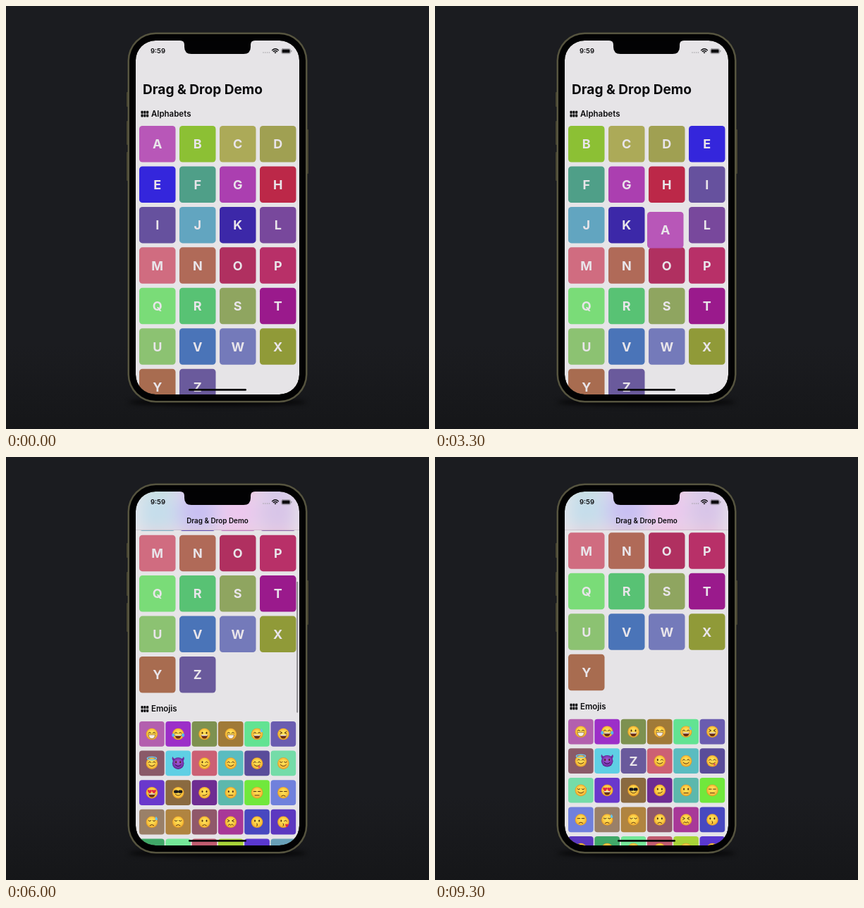
Animation, 600 px wide and 600 px high, one loop 9.4 s. Source, as an HTML page with a canvas:

```html
<!DOCTYPE html>
<html lang="en">
<head>
<meta charset="utf-8">
<title>Drag &amp; Drop Demo</title>
<style>
  html, body { margin: 0; width: 100%; height: 100%; overflow: hidden; background: #1b1c20; }
  canvas { display: block; }
</style>
</head>
<body>
<canvas id="stage" width="600" height="600"></canvas>
<script>
const canvas = document.getElementById('stage');
const ctx = canvas.getContext('2d');
const LOOP = 9400;
const PAPER = '#e6e4e7', INK = '#0b0b0d', LETTER = '#e9e5ea';

const letterColors = ('b857b8 8cc034 acaa58 a0a052 3426dc 4f9f88 ab3fb0 bc2848 66519e 62a5c0 3c28a8 78489c d06c80 ' +
  'b06a58 b03060 b83068 7adc78 58c274 8fa560 9a1a8c 8cc272 4a74b8 747aba 909a38 a86c50 6a5a9c').split(' ');
const faceColors = ('b35fae 9c2fc8 7d9150 a07a38 62e392 6a5cb0 8a5a68 5fcfe4 cc6074 5abcc0 5a4c9a 74dca8 6a38cc 8a6a40 ' +
  '6e2c92 5cb8ac 70e83c 7080dc 9a8068 b08440 90586a a83898 4848c0 5c38c0 40a868 74e898 c05c70 a8d438 5a38d0 68a0b8').split(' ');
// Each face is eyes, mouth and an optional extra.
const faces = '^T ^Dt oD ^T ^Dd >D ^)a oIi w) ^) ^)y u) hD s) o/ o- -- -( u(d u( o( >~ o. w.k ^. u. w) >) o( ^)'.split(' ');

// Drag paths: time, x, y, opacity, size (size for the second only).
const dragA = [[0, 189, 170, 1], [950, 189, 170, 1], [1150, 197, 174, .8], [1600, 260.5, 184, .8], [2000, 262, 226, .8],
  [2600, 286, 272, .8], [3000, 300, 293, .8], [3200, 300.5, 293, .85], [3300, 301, 292, 1], [3550, 303, 285, 1]];
const dragZ = [[6700, 246, 280, 1, 51.5], [7100, 241, 282, 1, 51.5], [7300, 242, 291, .8, 51.5], [7850, 255, 362, .8, 51.5],
  [8050, 263, 392, .8, 36], [8500, 270, 418, .8, 36], [8700, 269, 417, .9, 36], [8950, 263.6, 413, 1, 36]];
const scrollKeys = [[4150, 0], [4400, 22], [4700, 90], [5000, 152], [5400, 191], [5600, 212], [5900, 230], [6200, 235]];
const hovers = [[1430, 1], [1950, 5], [2250, 6], [2650, 10]];

const clamp = v => Math.max(0, Math.min(1, v));
const mix = (a, b, p) => a + (b - a) * p;
const ease = p => { p = clamp(p); return p * p * (3 - 2 * p); };

function track(keys, t) {
  let i = 0;
  while (i < keys.length - 2 && t > keys[i + 1][0]) i++;
  const [a, b] = [keys[i], keys[i + 1]];
  const p = clamp((t - a[0]) / (b[0] - a[0]));
  return a.slice(1).map((v, n) => mix(v, b[n + 1], p));
}

function box(x, y, w, h, r, color) {
  ctx.fillStyle = color;
  ctx.beginPath();
  ctx.roundRect(x, y, w, h, r);
  ctx.fill();
}

function text(str, x, y, size, color = INK, weight = 600, align = 'left') {
  ctx.font = `${weight} ${size}px Inter, sans-serif`;
  ctx.textAlign = align;
  ctx.fillStyle = color;
  ctx.fillText(str, x, y + size * .364);
}

function disc(x, y, rx, ry, color) {
  ctx.fillStyle = color;
  ctx.beginPath();
  ctx.ellipse(x, y, rx, ry, 0, 0, 7);
  ctx.fill();
}

function line(d, color, width = 1) {
  ctx.strokeStyle = color;
  ctx.lineWidth = width;
  ctx.stroke(new Path2D(d));
}

function shape(d, color) {
  ctx.fillStyle = color;
  ctx.fill(new Path2D(d));
}

function heading(str, y) {
  for (let i = 0; i < 6; i++) box(191.5 + i % 3 * 3.8, y - 3.7 + (i / 3 | 0) * 4.8, 3.1, 4, .8, INK);
  text(str, 206, y, 11.5);
}

function letterTile(i, x, y, size = 51.5) {
  box(x, y, size, size, 4.5, '#' + letterColors[i]);
  text(String.fromCharCode(65 + i), x + size / 2, y + size / 2, 18, LETTER, 700, 'center');
}

function eye(kind, x, side) {
  const brown = '#4a2c10';
  ctx.save();
  ctx.translate(x, -1.8);
  if (kind === 'w') kind = side < 0 ? 'o' : '^';
  if (kind === 'o') disc(0, 0, 1, 1.5, brown);
  if (kind === '^') line('M-1.8 .7Q0-2 1.8 .7', brown);
  if (kind === 'u') line('M-1.8-.3Q0 1.7 1.8-.3', brown);
  if (kind === '-') line('M-1.8 0H1.8', brown);
  if (kind === '>') { ctx.scale(-side, 1); line('M-1.5-1.5L1.3 0L-1.5 1.5', brown); }
  if (kind === 'h') shape('M0 3.2C-5-.5-2.6-4 0-1.5C2.6-4 5-.5 0 3.2', '#e52843');
  if (kind === 's') box(-3, -1.8, 6, 4.2, 1.6, '#17171b');
  ctx.restore();
}

const mouths = {
  ')': 'M-4 2Q0 6 4 2', '(': 'M-2.8 4.8Q0 2.4 2.8 4.8', '-': 'M-3 3.7H3', '/': 'M-2.5 4Q1.5 4.6 3.6 2',
  '~': 'M-3.5 4.5l1.7-1.5 1.8 1.5 1.8-1.5 1.7 1.5', '.': 'M-.5 2.2q2.4.7.2 1.6q2.4.7-.2 1.6', I: 'M-4 2Q0 6 4 2'
};

function face(code, x, y) {
  const [eyes, mouth, extra] = code;
  const imp = extra === 'i';
  ctx.save();
  ctx.translate(x, y);
  if (imp) shape('M-7-3Q-10-7-7.5-9.5Q-7-6-3-6.5ZM7-3Q10-7 7.5-9.5Q7-6 3-6.5Z', '#6b2aa0');
  const skin = ctx.createRadialGradient(0, -2, 2, 0, 0, 8.5);
  skin.addColorStop(0, imp ? '#9a52cc' : '#ffdf55');
  skin.addColorStop(.7, imp ? '#7b38b4' : '#f8c23c');
  skin.addColorStop(1, imp ? '#55207f' : '#dc8f22');
  disc(0, 0, 8.3, 8.3, skin);
  eye(eyes, -3, -1);
  eye(eyes, 3, 1);
  if (mouth === 'D' || mouth === 'T') {
    shape('M-4.8 1H4.8Q4 6.6 0 6.6T-4.8 1', mouth === 'T' ? '#f4eee4' : '#6b2e14');
    if (mouth === 'D') shape('M-4.4 1H4.4L4 2.6H-4Z', '#f4eee4');
    else line('M-4.8 1H4.8Q4 6.6 0 6.6T-4.8 1', '#7a4518', .6);
  } else line(mouths[mouth], imp ? '#2a0d45' : '#5a3413');
  if (extra === 't') { disc(-7, 1.5, 2, 2.6, '#57b7ee'); disc(7, 1.5, 2, 2.6, '#57b7ee'); }
  if (extra === 'd') shape('M6-8Q10-3 6.5-2.5Q3-3 6-8', '#62c4f2');
  if (extra === 'y') disc(3, 4.8, 1.4, 1.7, '#e5505e');
  if (extra === 'k') shape('M5 7.5C1 4 3.5 1.5 5 3.5C7 1.5 9 4 5 7.5', '#e52843');
  if (extra === 'a') {
    ctx.beginPath();
    ctx.ellipse(0, -7, 6.5, 2, 0, 0, 7);
    ctx.strokeStyle = '#6cc9ee';
    ctx.lineWidth = 1.5;
    ctx.stroke();
  }
  ctx.restore();
}

// Draws a grid cell whose item slides from one slot to another.
function gridPoint(from, to, p, cols, dx, dy, top) {
  return [189 + mix(from % cols, to % cols, p) * dx, top + mix(from / cols | 0, to / cols | 0, p) * dy];
}

function content(t, scroll) {
  text('Drag & Drop Demo', 194, 118 - scroll, 19.1, INK, 700);
  heading('Alphabets', 152.5 - scroll);
  heading('Emojis', 588.5 - scroll);

  for (let i = 1; i < 26; i++) {
    if (i === 25 && t >= 6700) continue;
    const hover = hovers.find(h => h[1] >= i);
    const p = hover ? ease((t - hover[0]) / 300) : 0;
    const [x, y] = gridPoint(i, i - 1, p, 4, 57, 57.45, 170 - scroll);
    letterTile(i, x, y);
  }

  faces.forEach((code, i) => {
    const p = i >= 8 ? ease((t - 8050) / 300) : 0;
    const [x, y] = gridPoint(i, i + 1, p, 6, 37.3, 41.6, 606.7 - scroll);
    if (y > 560) return;
    box(x, y, 35.7, 35.7, 4, '#' + faceColors[i]);
    face(code, x + 17.9, y + 18);
  });

  const a = track(dragA, t);
  ctx.globalAlpha = a[2];
  letterTile(0, a[0], a[1] - scroll);
  if (t >= 6700) {
    const z = track(dragZ, t);
    ctx.globalAlpha = z[2];
    letterTile(25, z[0], z[1], z[3]);
  }
  ctx.globalAlpha = 1;
}

function navBar(scroll) {
  const shown = clamp((scroll - 12) / 35);
  if (!shown) return;
  ctx.save();
  ctx.beginPath();
  ctx.rect(184, 49, 232, 55);
  ctx.clip();
  ctx.globalAlpha = shown;
  ctx.filter = 'blur(13px) saturate(1.8)';
  ctx.drawImage(canvas, 0, 0);
  ctx.filter = 'none';
  box(184, 49, 232, 55, 0, 'rgba(236,234,238,.77)');
  box(184, 103.5, 232, .5, 0, 'rgba(0,0,0,.2)');
  text('Drag & Drop Demo', 300, 90.5, 9.9, INK, 600, 'center');
  ctx.restore();
}

function statusBar() {
  text('9:59', 205, 64, 9.5);
  for (let i = 0; i < 4; i++) disc(365 + i * 2.8, 66, .8, .8, '#a3a1a6');
  line('M377.6 62.8Q382 58.8 386.4 62.8M379.3 64.6Q382 62.2 384.7 64.6', INK, 1.4);
  shape('M380.4 65.8Q382 64.6 383.6 65.8L382 67.6Z', INK);
  ctx.strokeStyle = '#8b898e';
  ctx.lineWidth = .7;
  ctx.beginPath();
  ctx.roundRect(390.6, 60.6, 13, 7, 2);
  ctx.stroke();
  box(391.6, 61.6, 11, 5, 1.2, INK);
  box(404.3, 62.8, .9, 2.6, .5, '#8b898e');
}

function scrollThumb(t, scroll) {
  ctx.globalAlpha = clamp((t - 4150) / 150) * clamp((6700 - t) / 300);
  box(412.2, 105 + scroll * .31, 2, 186, 1, '#8d8b90');
  ctx.globalAlpha = 1;
}

// Everything around the screen, painted over the content.
function phone() {
  ctx.save();
  const hole = new Path2D();
  hole.rect(0, 0, 600, 600);
  hole.roundRect(184, 49, 232, 502, 28);
  ctx.clip(hole, 'evenodd');
  box(0, 0, 600, 600, 0, '#1b1c20');
  const floor = ctx.createLinearGradient(0, 480, 0, 600);
  floor.addColorStop(0, 'rgba(20,21,23,0)');
  floor.addColorStop(1, 'rgba(20,21,23,.8)');
  box(0, 480, 600, 120, 0, floor);
  ctx.filter = 'blur(3px)';
  disc(300, 562, 126, 5, '#050506');
  ctx.filter = 'none';
  for (const [y, h] of [[122, 21], [163, 34], [207, 41]]) box(171, y, 3, h, 1, '#45432f');
  box(426, 175, 3, 63, 1, '#45432f');
  box(172.5, 37.5, 255, 525, 40, '#56543f');
  box(175, 40, 250, 520, 37.5, '#020203');
  ctx.restore();
  shape('M247 48.5V49q6 0 6 6v3q0 10 10 10h74q10 0 10-10v-3q0-6 6-6v-.5z', '#020203');
  box(259, 543, 82, 2.8, 1.4, '#08080a');
}

function draw(now) {
  const t = now % LOOP;
  const [scroll] = track(scrollKeys, t);
  box(0, 0, 600, 600, 0, PAPER);
  content(t, scroll);
  navBar(scroll);
  scrollThumb(t, scroll);
  statusBar();
  phone();
  requestAnimationFrame(draw);
}

ctx.lineCap = ctx.lineJoin = 'round';
requestAnimationFrame(draw);
</script>
</body>
</html>
```
